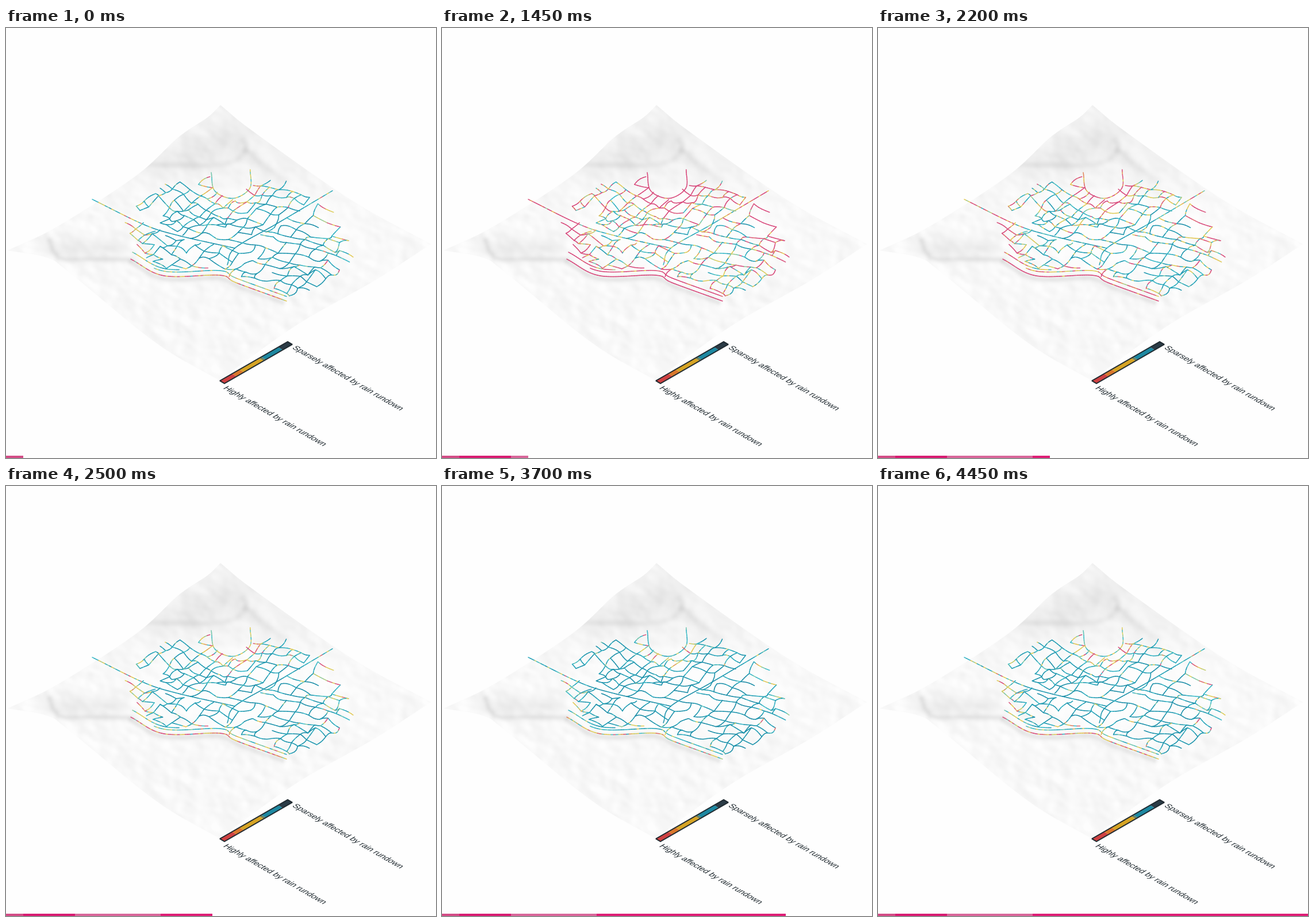
Animation, 748 px wide and 748 px high, one loop 4600 ms. Source, as a matplotlib script:

```python
import numpy as np
import matplotlib.pyplot as plt
from matplotlib.animation import FuncAnimation
from matplotlib.collections import LineCollection
from matplotlib.colors import LinearSegmentedColormap
from matplotlib.patches import PathPatch, Polygon, Rectangle
from matplotlib.path import Path
from matplotlib.textpath import TextPath
from matplotlib.transforms import Affine2D

SIZE, DPI = 748, 100
PX = 72 / DPI
TICK, LOOP, HOLD, STEP = 50, 4600, 1000, 150
STEPS = 1 + (LOOP - HOLD) // STEP + 0
INK = "#1f292f"
rng = np.random.default_rng(12)

fig = plt.figure(figsize=(SIZE / DPI, SIZE / DPI), dpi=DPI, facecolor="#fefefe")
ax = fig.add_axes([0, 0, 1, 1])
ax.set(xlim=(0, SIZE), ylim=(SIZE, 0))
ax.axis("off")


def smooth(t):
    t = np.clip(t, 0, 1)
    return t * t * (3 - 2 * t)


def curve(pts, step=4):
    """Catmull-Rom curve through pts, sampled about every step pixels."""
    p = np.array(pts, float)
    p = np.vstack([2 * p[0] - p[1], p, 2 * p[-1] - p[-2]])
    out = []
    for a, b, c, d in zip(p, p[1:], p[2:], p[3:]):
        n = max(2, int(np.hypot(*(c - b)) / step))
        t = np.arange(n)[:, None] / n
        out.append(0.5 * (2 * b + (c - a) * t + (2 * a - 5 * b + 4 * c - d) * t**2
                          + (3 * b - a - 3 * c + d) * t**3))
    return np.vstack(out + [p[-2:-1]])


def distance(x, y, pts):
    """Distance from each (x, y) to a polyline."""
    best = np.full(np.shape(x), 1e9)
    for (x0, y0), (x1, y1) in zip(pts, pts[1:]):
        dx, dy = x1 - x0, y1 - y0
        t = np.clip(((x - x0) * dx + (y - y0) * dy) / (dx * dx + dy * dy), 0, 1)
        best = np.minimum(best, np.hypot(x - x0 - t * dx, y - y0 - t * dy))
    return best


def radius(x, y, cx, cy, rx, ry, tilt=0):
    """Normalised distance from the middle of an ellipse; 1 on its outline."""
    c, s = np.cos(np.radians(tilt)), np.sin(np.radians(tilt))
    return np.hypot(((x - cx) * c + (y - cy) * s) / rx, ((y - cy) * c - (x - cx) * s) / ry)


def blob(*args):
    return np.exp(-radius(*args) ** 2)


# terrain
TOP, RIGHT, BOTTOM, LEFT = (373, 134), (739, 376), (371, 613), (3, 387)
SIDES = [[TOP, (430, 180), (600, 299), RIGHT],
         [RIGHT, (640, 440), (505, 517), BOTTOM],
         [BOTTOM, (260, 547), (110, 425), (70, 399), LEFT],
         [LEFT, (90, 345), (225, 258), (300, 190), (350, 156), TOP]]
RIM = curve([(217, 402), (275, 431), (372, 430), (400, 443), (488, 475)])
KNOLL = [(76, 370), (92, 400), (150, 402), (217, 403)]
CREST = [(412, 195), (417, 212), (380, 237), (245, 238)]
SPUR = [(416, 212), (445, 237), (486, 266)]


def relief(n):
    """Soft fractal height noise lit from the side."""
    f = np.fft.fftfreq(n)
    k = np.hypot(f[:, None] * 0.8, f[None, :])
    spec = np.fft.fft2(rng.normal(size=(n, n))) * np.exp(-(k / 0.1) ** 2) / (k + 0.015) ** 1.3
    h = np.fft.ifft2(spec).real
    g = np.gradient(h, axis=1) - 0.5 * np.gradient(h, axis=0)
    return g / g.std()


def draw_land():
    n = SIZE // 2
    x, y = np.meshgrid(np.arange(n) * 2 + 1, np.arange(n) * 2 + 1)
    dark = 0.026 + 0.022 * smooth((330 - y) / 120)
    dark += 0.045 * blob(x, y, 345, 212, 85, 26, -25)
    dark += 0.03 * blob(x, y, 440, 238, 45, 12, 40)
    dark += 0.055 * blob(x, y, 125, 383, 52, 18, 5)
    dark += 0.045 * blob(x, y, 190, 378, 20, 18, 10)
    dark -= 0.03 * blob(x, y, 410, 355, 165, 72, 4)
    for amount, width, pts in [(0.06, 5, KNOLL), (0.04, 6, CREST), (0.035, 6, SPUR),
                               (0.07, 5, RIM[::4] + (0, 5))]:
        dark += amount * np.exp(-(distance(x, y, curve(pts, 12)) / width) ** 2)
    dark += 0.009 * relief(n) * (1 - 0.8 * blob(x, y, 410, 355, 165, 75))
    grey = np.clip(1 - dark, 0, 0.996)
    land = ax.imshow(np.dstack([grey] * 3), extent=(0, SIZE, SIZE, 0),
                     interpolation="bilinear", aspect="auto", zorder=1)
    land.set_clip_path(Path(np.vstack([curve(s) for s in SIDES])), ax.transData)


# streets
TOWN = (407, 366, 192, 106, 7)
HILL = (392, 262, 32, 30)


def in_town(x, y):
    below = y > np.interp(x, *RIM.T) + 2 and x < 488
    return radius(x, y, *TOWN) < 1 and radius(x, y, *HILL) > 1 and not below


def lattice(a, b):
    """Two slanted families of streets, gently bent."""
    x = 405 + 0.92 * a + 0.62 * b
    y = 366 + 0.32 * a - 0.54 * b
    return np.array([x + 13 * np.sin(y / 45 + x / 110),
                     y + 8 * np.sin(x / 52 + 0.8) + 3 * np.sin(y / 21 + x / 60)])


def build_streets():
    turn = np.linspace(-0.15, 1.1, 5) * np.pi
    cx, cy, rx, ry = HILL
    main = [RIM, RIM[12:] - (0, 8), RIM[: len(RIM) // 3] + (3, -12),
            curve([(150, 298), (240, 342), (300, 361), (398, 383)]),
            curve([(568, 283), (470, 341), (398, 383), (385, 412)]),
            curve(np.c_[cx + 1.15 * rx * np.cos(turn), cy + 1.15 * ry * np.sin(turn)])]
    lines = list(main)
    n = 34
    la, lb = (np.cumsum(rng.uniform(13, 25, n)) - 310 for _ in range(2))
    shift = rng.normal(0, 2.6, (n, n, 2))
    t = np.linspace(0, 1, 6)
    for i in range(n - 1):
        for j in range(n - 1):
            for di, dj, drop in ((1, 0, 0.1), (0, 1, 0.2)):
                skip = rng.random() < drop
                bow = rng.normal(0, 1.3, 2)
                p = lattice(la[i] + t * (la[i + di] - la[i]), lb[j] + t * (lb[j + dj] - lb[j])).T
                p += shift[i, j] + t[:, None] * (shift[i + di, j + dj] - shift[i, j])
                p += np.sin(np.pi * t)[:, None] * bow
                mid = p[2:4].mean(axis=0)
                if skip or not in_town(*mid):
                    continue
                if min(distance(*mid, m[::3]) for m in main) > 4:
                    lines.append(p)
    return lines


def runoff(x, y):
    """Extra exposure on the rim, around the hill and at the town's flanks."""
    wet = 0.38 * np.exp(-(distance(x, y, RIM) / 13) ** 2)
    wet += 0.34 * np.exp(-((radius(x, y, *HILL) - 1.2) / 0.75) ** 2)
    flank = np.clip((radius(x, y, *TOWN) - 0.75) / 0.3, 0, 1)
    wet += 0.4 * flank * np.exp(-((y - 350) / 55) ** 2)
    return np.minimum(wet, 0.46)


segs, exposure = [], []
for line in build_streets():
    s = np.stack([line[:-1], line[1:]], axis=1)
    mood = rng.normal(0, 0.35)
    speckle = rng.normal(0, 0.4, len(s))
    segs.append(s)
    exposure.append(0.13 * np.exp(mood + speckle)
                    + runoff(*s.mean(axis=1).T) * np.exp(0.5 * mood + 0.5 * speckle))
exposure = np.concatenate(exposure)

heat = LinearSegmentedColormap.from_list("heat", [
    (0, "#1684a0"), (.2, "#1b98b0"), (.38, "#38bccb"), (.45, "#7fc8a6"), (.5, "#dccf5c"),
    (.66, "#e6c34c"), (.72, "#e2735f"), (.77, "#dc5a80"), (1, "#d84579")])
streets = LineCollection(np.concatenate(segs), linewidths=1.5 * PX, capstyle="round",
                         cmap=heat, zorder=3)
streets.set_clim(0, 1)
ax.add_collection(streets)


def rain(k):
    """A storm early in the loop, then a slow dry spell that ends quickly."""
    storm = smooth((k - 0.5) / 4) * (1 - smooth((k - 6.5) / 4.5))
    base = smooth(abs(k - 21) / (4 if k > 21 else 9))
    return 0.16 * base + 0.84 * storm


# legend
def bar_piece(s0, s1, **style):
    corners = [(372 + 118 * s + 8 * t, 613.7 - 68 * s + 4.7 * t)
               for s, t in ((s0, 0), (s1, 0), (s1, 1), (s0, 1))]
    ax.add_patch(Polygon(corners, closed=True, **style))


def ground_text(x, y, text):
    """Text lying flat on the isometric ground plane."""
    c, s = np.cos(np.pi / 6), 0.5
    iso = Affine2D(np.array([[c, c, x], [s, -s, y], [0, 0, 1]]))
    glyphs = TextPath((0, 0), text, size=14.4, prop={"family": "Liberation Sans"})
    ax.add_patch(PathPatch(iso.transform_path(glyphs), facecolor=INK, edgecolor="none", zorder=5))


draw_land()
stops = [0, .18, .29, .58, .61, .86, 1]
hues = ["#cf4142", "#d9772c", "#d6a424", "#6d7f5c", "#1d88a1", "#2b3b46"]
for s0, s1, hue in zip(stops, stops[1:], hues):
    bar_piece(s0, s1, facecolor=hue, edgecolor="none", zorder=4)
bar_piece(0, 1, facecolor="none", edgecolor=INK, linewidth=1.9 * PX, zorder=5)
ground_text(497, 557, "Sparsely affected by rain rundown")
ground_text(377, 627, "Highly affected by rain rundown")

# progress bar
UNIT = SIZE / STEPS
progress = []
for k0, k1, hue in [(0, 1, "#d34c86"), (1, 4, "#d81b72"), (4, 9, "#d9669a"),
                    (9, STEPS, "#de1d76")]:
    part = Rectangle((k0 * UNIT, 744), 0, 4, facecolor=hue, edgecolor="none", zorder=6)
    ax.add_patch(part)
    progress.append((part, k0, k1))


def update(i):
    t = i * TICK
    k = 0 if t < HOLD else 1 + (t - HOLD) // STEP
    streets.set_array(exposure * (1 + 2.4 * rain(k)))
    for part, k0, k1 in progress:
        part.set_width(max(0, min(k + 1, k1) - k0) * UNIT)
    return [streets] + [p[0] for p in progress]


anim = FuncAnimation(fig, update, frames=LOOP // TICK, interval=TICK, repeat=True,
                     repeat_delay=0, blit=False)
plt.show()
```
